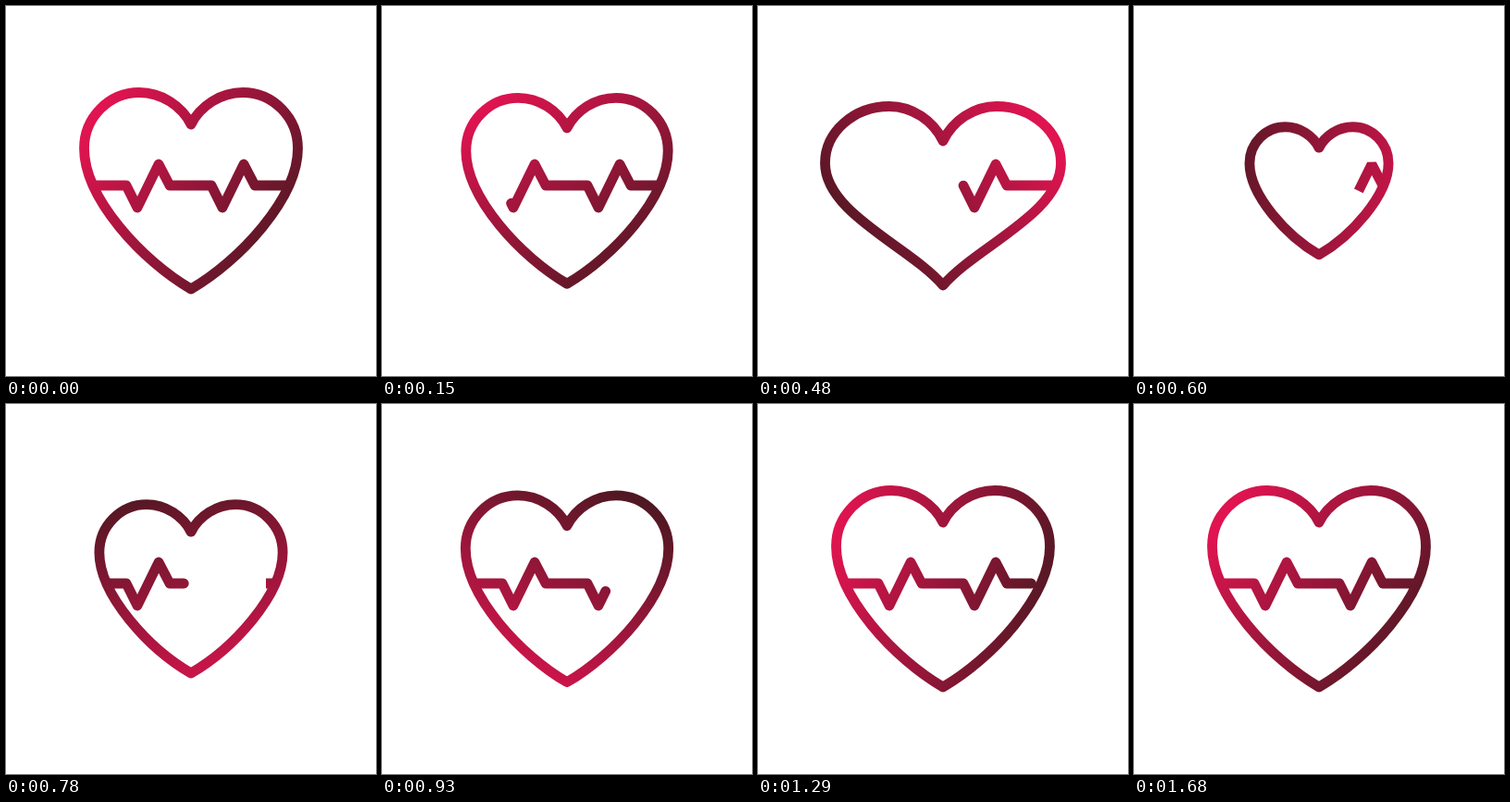
Recreate the animation shown at these times as an HTML page with a canvas. Size 400 by 400 pixels, loop 1710 ms.

```html
<!DOCTYPE html>
<html>
<head>
<meta charset="utf-8">
<style>
html, body { margin: 0; width: 100%; height: 100%; overflow: hidden; background: #fff; }
canvas { display: block; }
</style>
</head>
<body>
<canvas id="stage" width="400" height="400"></canvas>
<script>
const ctx = document.getElementById('stage').getContext('2d');
const LOOP = 1710, STEP = 30, SHRINK_END = 600, SMALL = 0.65;

// Key measures of the left half, from the centre; flank and foot steer the lower curve
const REST = { notch: -72, lobe: -56, top: -106.5, side: -115.5, waist: -46, flank: 8, footX: -52, footY: 76, tip: 106 };
const WIDE = { notch: -54, lobe: -58, top: -91.5, side: -127.5, waist: -30, flank: 24, footX: -36, footY: 60, tip: 102 };

const BEAT = 'l12 24 23-47 12 23';
const pulse = new Path2D(`M93 194h37${BEAT}h45${BEAT}h56`);
const PULSE_LENGTH = 333;

const mix = (a, b, u) => a + (b - a) * u;
const clamp = u => Math.min(1, Math.max(0, u));
const smooth = u => u * u * (3 - 2 * u);

// Shrinks, flares wide just before the smallest size, then grows back
function heartShape(t) {
  const scale = t < SHRINK_END
    ? mix(1, SMALL, smooth(t / SHRINK_END))
    : mix(1, SMALL, (1 - clamp((t - SHRINK_END) / 692)) ** 3);
  const flare = Math.sin(Math.PI * clamp((t - 360) / 240)) ** 2;
  const shape = {};
  for (const key in REST) shape[key] = mix(REST[key] * scale, WIDE[key], flare);
  return shape;
}

function heartPath({ notch, lobe, top, side, waist, flank, footX, footY, tip }) {
  const path = new Path2D();
  const half = [
    [0, notch], [lobe * 0.18, mix(notch, top, 0.58)], [lobe * 0.57, top],
    [lobe, top], [mix(lobe, side, 0.55), top], [side, mix(waist, top, 0.55)],
    [side, waist], [side, flank], [footX, footY], [0, tip]
  ];
  const mirrored = half.slice(0, -1).reverse().map(([x, y]) => [-x, y]);
  const points = [...half, ...mirrored].map(([x, y]) => [200 + x, 200 + y]);
  path.moveTo(...points[0]);
  for (let i = 1; i < points.length; i += 3) {
    path.bezierCurveTo(...points[i], ...points[i + 1], ...points[i + 2]);
  }
  path.closePath();
  return path;
}

function turningPaint(t) {
  const turn = 1 - (1 - (t / LOOP) ** 1.7) ** 3;
  const a = (35 + 360 * turn) * Math.PI / 180, c = Math.cos(a), s = Math.sin(a);
  const paint = ctx.createLinearGradient(200 - 128 * c, 200 - 128 * s, 200 + 140 * c, 200 + 140 * s);
  paint.addColorStop(0, '#df1450');
  paint.addColorStop(1, '#45181f');
  return paint;
}

function strokePulse(from, length) {
  ctx.setLineDash([length, 999]);
  ctx.lineDashOffset = -from;
  ctx.stroke(pulse);
}

function draw(t) {
  ctx.fillStyle = '#fff';
  ctx.fillRect(0, 0, 400, 400);
  ctx.strokeStyle = turningPaint(t);
  ctx.lineWidth = 10.8;
  ctx.lineCap = ctx.lineJoin = 'round';

  const heart = heartPath(heartShape(t));
  ctx.stroke(heart);

  ctx.save();
  ctx.clip(heart);
  if (t > 566) {
    const left = clamp((1680 - t) / 1114);
    strokePulse(0, PULSE_LENGTH * (1 - left ** 3));
    ctx.lineCap = 'butt';
    ctx.lineJoin = 'bevel';
  }
  const erased = 0.39 * t;
  if (erased < PULSE_LENGTH) strokePulse(erased, 500);
  ctx.restore();
}

function frame() {
  draw(Math.floor(performance.now() % LOOP / STEP) * STEP);
  requestAnimationFrame(frame);
}
frame();
</script>
</body>
</html>
```
